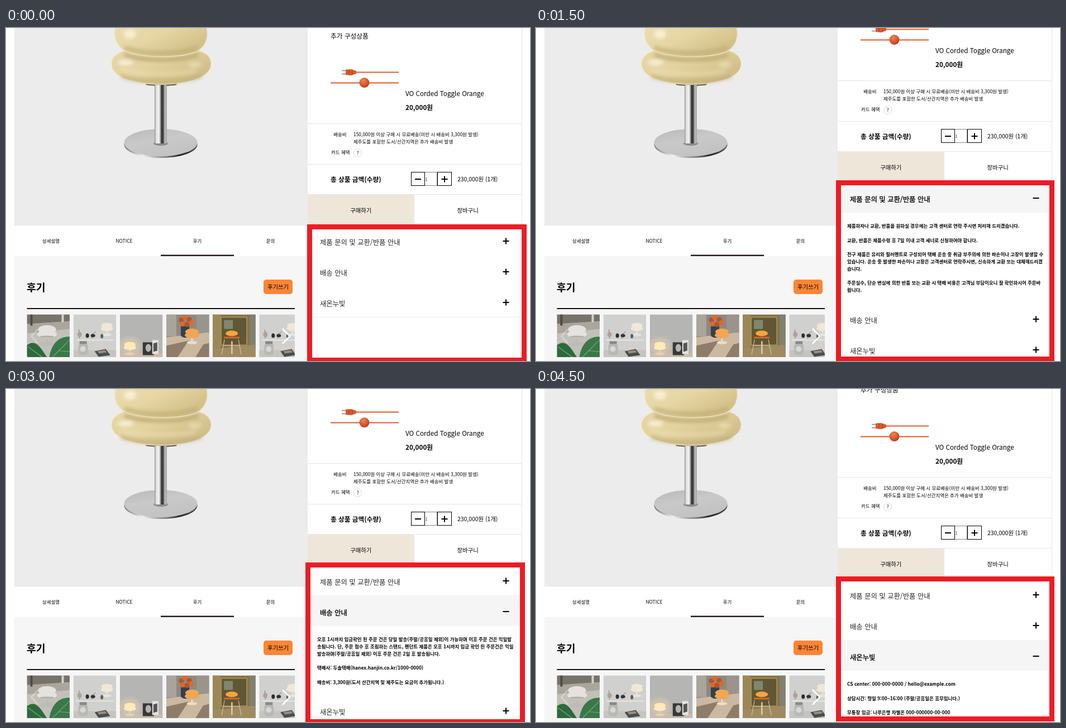
Write an HTML page that moves like this. It is 938 px wide and 597 px high and loops after 6000 ms.

```html
<!DOCTYPE html>
<html lang="ko">
<head>
<meta charset="utf-8">
<title>상품 상세</title>
<style>
html, body { margin: 0; width: 100%; height: 100%; overflow: hidden; background: #fff; }
svg { display: block; }
text { font-family: "Noto Sans CJK KR", "Noto Sans CJK", "Noto Sans KR", sans-serif; fill: #000; white-space: pre; }
.open { stroke: #000; stroke-width: .3px; }
.closed { fill: #262626; }
</style>
</head>
<body>
<svg id="stage" width="938" height="597" viewBox="0 0 938 597">
  <defs>
    <linearGradient id="upper" x2=".9" y2=".6">
      <stop offset="0" stop-color="#eadcae"/><stop offset=".5" stop-color="#e5d6a4"/><stop offset="1" stop-color="#d3c18a"/>
    </linearGradient>
    <linearGradient id="lower" x2=".9" y2=".6">
      <stop offset="0" stop-color="#e6d7a8"/><stop offset=".5" stop-color="#e3d39f"/><stop offset="1" stop-color="#d2c08b"/>
    </linearGradient>
    <linearGradient id="stem">
      <stop offset="0" stop-color="#8d8d8d"/><stop offset=".12" stop-color="#dedede"/><stop offset=".36" stop-color="#f4f4f4"/>
      <stop offset=".48" stop-color="#999"/><stop offset=".56" stop-color="#333"/><stop offset=".72" stop-color="#4a4a4a"/>
      <stop offset=".82" stop-color="#bbb"/><stop offset="1" stop-color="#a5a5a5"/>
    </linearGradient>
    <linearGradient id="plate" x2=".5" y2="1">
      <stop offset="0" stop-color="#b9b9b9"/><stop offset=".5" stop-color="#c9c9c9"/><stop offset="1" stop-color="#c2c2c2"/>
    </linearGradient>
    <linearGradient id="rim">
      <stop offset="0" stop-color="#777"/><stop offset=".25" stop-color="#eee"/><stop offset=".55" stop-color="#888"/><stop offset=".75" stop-color="#222"/><stop offset="1" stop-color="#555"/>
    </linearGradient>
    <radialGradient id="ball" cx=".4" cy=".3" r=".75">
      <stop offset="0" stop-color="#f08355"/><stop offset=".6" stop-color="#d9572c"/><stop offset="1" stop-color="#a33c1c"/>
    </radialGradient>
    <filter id="soft" x="-30%" y="-80%" width="160%" height="260%"><feGaussianBlur stdDeviation="3"/></filter>
  </defs>
  <g id="left"></g>
  <g id="side"></g>
  <path id="frame" fill="#ed1c24" fill-rule="evenodd"/>
</svg>
<script>
const $ = id => document.getElementById(id);
const rect = (x, y, w, h, fill, more = '') => `<rect x="${x}" y="${y}" width="${w}" height="${h}" fill="${fill}" ${more}/>`;
const oval = (x, y, rx, ry, fill, more = '') => `<ellipse cx="${x}" cy="${y}" rx="${rx}" ry="${ry}" fill="${fill}" ${more}/>`;
const path = (d, fill, more = '') => `<path d="${d}" fill="${fill}" ${more}/>`;
const stroke = (d, color, width, more = '') => path(d, 'none', `stroke="${color}" stroke-width="${width}" ${more}`);
// cy is the middle of the glyphs
const text = (x, cy, size, str, weight = 400, anchor = 'start', more = '') =>
  `<text x="${x}" y="${cy + size * .37}" font-size="${size}" font-weight="${weight}" text-anchor="${anchor}" ${more}>${str}</text>`;
const minus = (x, y) => rect(x - 5.5, y - 1, 11, 2, '#000');
const plus = (x, y) => minus(x, y) + rect(x - 1, y - 5.5, 2, 11, '#000');

function bigLamp() {
  const soft = opacity => `filter="url(#soft)" opacity="${opacity}"`;
  return oval(278, 101, 28, 3, '#55503f') +
    oval(277, 209, 65.5, 24, 'url(#rim)') + oval(277, 205.5, 65.5, 24.5, 'url(#plate)') +
    oval(277, 207, 13, 4, '#8b8b8b') + rect(266, 102, 22, 105, 'url(#stem)') +
    path('M210 41C192 47 185 59 190 72C197 91 235 101 278 101C320 101 359 91 366 72C371 57 363 46 347 41Z', 'url(#lower)', 'stroke="#f3ead0" stroke-width="1.5"') +
    stroke('M212 48C245 60 310 60 344 48', '#b39f66', 6, soft(.8)) +
    stroke('M206 86C240 99 316 99 350 86', '#bca974', 6, soft(.7)) +
    stroke('M206 74C240 84 310 84 340 76', '#efe3ba', 5, soft(.6)) +
    path('M196 -3C191 18 198 34 215 42C245 54 310 54 340 43C357 35 364 18 359 -3Z', 'url(#upper)', 'stroke="#f1e8cb" stroke-width="1.5"') +
    stroke('M212 35C245 48 310 48 343 35', '#bda96f', 7, soft(.7)) +
    oval(222, 11, 11, 8, '#f9f2d8', soft(.9)) +
    oval(214, 62, 14, 5, '#f9f3de', soft(.9)) +
    oval(338, 66, 12, 5, '#f5ecca', soft(.5));
}

function smallLamp(x, y, w, color, foot = '#d8d4cd') {
  return rect(x - w * .05, y, w * .1, w * .75, foot) + oval(x, y + w * .75, w * .36, w * .11, foot) +
    oval(x, y, w * .46, w * .22, color) + oval(x, y + w * .24, w * .5, w * .21, color);
}

function shelf() {
  return rect(0, 0, 77, 77, '#d0d1cf') + rect(0, 64, 77, 13, '#c6c4bf') +
    smallLamp(60, 20, 22, '#f1e7d7', '#e7e4de') + stroke('M5 46H72', '#e6e5e1', 2) +
    stroke('M10 27L11 43M33 43V36L40 31', '#777', 1) +
    oval(11, 36, 4, 5, '#b0a299') + oval(25, 38, 3, 4, '#2d2d2d') + oval(35, 38, 4, 3, '#333') + oval(51, 39, 2.5, 4, '#6b5a50') +
    rect(9, 52, 17, 21, '#b8b8b5', 'rx="5"') + rect(11, 48, 13, 5, '#888987') + oval(17, 62, 5, 5, '#d8d8d5') +
    path('M38 66L58 62L66 73L45 76Z', '#465052') + path('M43 66L57 64L60 68L46 70Z', '#a78a77');
}

const photos = [
  rect(0, 0, 77, 77, '#aaa69e') + path('M0 0H77V12L0 17Z', '#77736b') + rect(6, 0, 4, 20, '#4f4a43') + rect(62, 0, 4, 14, '#d5d2cc') +
    path('M0 34L77 26V77H0Z', '#c3c0ba') + path('M0 55C16 43 25 60 36 77H0Z', '#2d6a3b') + path('M40 77C44 49 60 39 77 40V77Z', '#397847') +
    stroke('M2 58L28 77M46 76L77 45M57 65L77 67', '#77a97d', 1.2) + smallLamp(36, 27, 35, '#e4e2de', '#bdbbb6') +
    oval(36, 40, 13, 2, '#b5b2ac'),
  shelf(),
  rect(0, 0, 77, 77, '#b5b5b4') + rect(0, 69, 77, 8, '#c9bcaa') + oval(18, 57, 20, 17, '#d8c9ae', 'filter="url(#soft)" opacity=".65"') +
    smallLamp(18, 54, 22, '#ffe9b9', '#e3d1b4') + rect(41, 50, 20, 23, '#383838') + oval(51, 60, 5, 7, '#b4b4b2') +
    rect(58, 46, 11, 25, '#e5e3df') + path('M60 52L67 50V65L60 67Z', '#555'),
  rect(0, 0, 77, 77, '#8e8980') + rect(0, 0, 18, 39, '#a9a59d') + rect(54, 0, 23, 35, '#99958c') + path('M0 41L77 32V77H0Z', '#cbb8a1') +
    path('M0 56L40 47L20 77H0ZM52 77L66 54L77 51V77Z', '#8f7c69') + path('M26 21H41L42 38C38 43 30 43 26 38Z', '#34414b') +
    [[27, 10], [33, 5], [41, 9], [29, 17], [37, 18], [45, 15]].map(([x, y], i) => oval(x, y, 4.5, 4.5, i % 2 ? '#e0682a' : '#b75227')).join('') +
    smallLamp(46, 31, 26, '#f3a552', '#ebddc8'),
  rect(0, 0, 77, 77, '#86724a') + rect(0, 0, 14, 77, '#9c8756') + rect(15, 5, 46, 50, '#5f5735', 'stroke="#a98d55" stroke-width="2"') +
    rect(20, 10, 16, 16, '#7f876f') + rect(66, 0, 11, 60, '#80816f') + path('M0 62L77 54V77H0Z', '#a08a62') +
    oval(34, 34, 11, 5, '#f5a53a') + rect(20, 40, 28, 3, '#d66a26') +
    stroke('M21 45L16 72M46 45L51 72M20 56H49', '#cfc2a0', 1.2) + rect(33, 48, 2.5, 23, '#dccfb0'),
  shelf()
];

function drawLeft() {
  const tabs = ['상세설명', 'NOTICE', '후기', '문의'];
  $('left').innerHTML =
    rect(15, 0, 525, 354.5, '#ececec') + bigLamp() +
    tabs.map((t, i) => text(80.5 + 131 * i, 382, 8.45, t, 400, 'middle')).join('') +
    rect(15, 409, 525, 188, '#f6f6f6') + rect(277, 406.5, 131, 2.5, '#2a1b1e') +
    text(37, 465.5, 18.2, '후기', 700) +
    rect(461, 451, 52, 26, '#fd8535', 'rx="5"') + text(487, 464.2, 10.4, '후기쓰기', 400, 'middle') +
    rect(37.5, 502, 479.5, 2, '#111') +
    photos.map((p, i) => `<svg x="${37.5 + 83.15 * i}" y="513.5" width="${i < 5 ? 76.5 : 63.7}" height="76.5">${p}</svg>`).join('') +
    stroke('M57 540L45.5 552.5L57 565', '#fff', 2.4, 'opacity=".35"') +
    stroke('M495 539L508 552.5L495 566', '#fff', 2.6);
}

function cable() {
  return rect(626, 78.3, 77, 2.2, '#e2683f') + rect(581, 97.3, 122, 2.2, '#e2683f') +
    stroke('M601 76.5H610M601 82.5H610', '#8d8078', 1.5) +
    path('M608 74.5L618 74L627 77V82L618 85L608 84Z', '#d9592d') + stroke('M614 75V84M620 75.5V83.5', '#a9421f', 1) +
    oval(641.5, 98, 9, 9, 'url(#ball)');
}

function product() {
  const rule = y => rect(540, y, 383, 1, '#e5e5e5');
  return text(581, 15, 11.7, '추가 구성상품') + cable() +
    text(715, 117.5, 11.7, 'VO Corded Toggle Orange') + text(715, 142.3, 11.7, '20,000원', 700) +
    rule(171) + text(598, 191, 8.45, '배송비', 400, 'middle') +
    text(622, 191, 8.45, '150,000원 이상 구매 시 무료배송(미만 시 배송비 3,300원 발생)') +
    text(622, 204, 8.45, '제주도를 포함한 도서/산간지역은 추가 배송비 발생') +
    text(582, 223, 8.45, '카드 혜택') +
    rect(622.5, 217, 14, 14, '#fff', 'rx="6" stroke="#ddd"') + text(629.7, 224, 8.5, '?', 500, 'middle') +
    rule(244) + text(581, 271.5, 11.7, '총 상품 금액(수량)', 700) +
    rect(749.5, 258.5, 22, 24, '#fff', 'stroke="#888"') +
    rect(725.5, 258.5, 24, 24, 'none', 'stroke="#000"') + rect(772.5, 258.5, 25, 24, 'none', 'stroke="#000"') +
    minus(737.5, 271) + plus(785, 271) + text(750.5, 271, 7, '1', 400, 'start', 'style="fill:#5a2a12"') +
    text(808, 271.5, 10.4, '230,000원 (1개)') +
    rule(298) + rect(540, 299, 191, 54, '#efe6da') +
    text(635.3, 327, 10.4, '구매하기', 400, 'middle') + text(826.7, 327, 10.4, '장바구니', 400, 'middle') +
    rect(923, 0, 1, 430, '#e5e5e5');
}

const panels = [
  { title: '제품 문의 및 교환/반품 안내', height: 162, lines: [
    '제품하자나 교환, 반품을 원하실 경우에는 고객 센터로 연락 주시면 처리해 드리겠습니다.', '',
    '교환, 반품은 제품수령 후 7일 이내 고객 세너로 신청하여야 합니다.', '',
    '전구 제품은 유리와 필러멘트로 구성되어 택배 운송 중 취급 부주의에 의한 파손이나 고장이 발생할 수',
    '있습니다. 운송 중 발생한 파손이나 고장은 고객센터로 연락주시면, 신속하게 교환 또는 대체해드리겠',
    '습니다.', '',
    '주문실수, 단순 변심에 의한 반품 또는 교환 시 택배 비용은 고객님 부담이오니 잘 확인하시어 주문바',
    '랍니다.'] },
  { title: '배송 안내', height: 123, lines: [
    '오후 1시까지 입금확인 된 주문 건은 당일 발송(주말/공휴일 제외)이 가능하며 이후 주문 건은 익일발',
    '송됩니다. 단, 주문 접수 후 조립하는 스탠드, 펜던트 제품은 오후 1시까지 입금 확인 된 주문건은 익일',
    '발송하며(주말/공휴일 제외) 이후 주문 건은 2일 후 발송됩니다.', '',
    '택배사: 두솔택배(hanex.hanjin.co.kr/1000-0000)', '',
    '배송비: 3,300원(도서 산간지역 및 제주도는 요금이 추가됩니다.)'] },
  { title: '새온누빛', height: 123, lines: [
    'CS center: 000-000-0000 / hello@example.com', '',
    '상담시간: 평일 9:00~16:00 (주말/공휴일은 휴무입니다.)', '',
    '무통장 입금: 나루은행 차별온 000-000000-00-000'] }
];

function accordion(open) {
  let y = 353, out = '';
  panels.forEach((p, i) => {
    const on = i === open;
    out += rect(540, y, 383, 55, on ? '#f5f5f5' : '#fff') +
      text(562, y + 31.2, 12.35, p.title, 400, 'start', `class="${on ? 'open' : 'closed'}"`) +
      (on ? minus : plus)(895, y + 29);
    y += 55;
    if (on) {
      out += p.lines.map((s, n) => text(557, y + 24 + 12.75 * n, 8.45, s, 700)).join('');
      y += p.height;
    }
    out += rect(540, y, 383, 1, '#eaeaea');
  });
  return out;
}

// open panel, scroll offset, outer and inner edges of the red frame
const states = [
  { open: -1, scroll: 0, outer: [539, 352, 932, 597], inner: [548, 361, 923, 591] },
  { open: 0, scroll: -77, outer: [537, 273, 928, 597], inner: [546, 282, 919, 589] },
  { open: 1, scroll: -38, outer: [536, 311, 929, 597], inner: [545, 320, 920, 592] },
  { open: 2, scroll: -13, outer: [537, 336, 928, 596], inner: [546, 345, 919, 587] }
];
const box = ([x, y, r, b]) => `M${x} ${y}H${r}V${b}H${x}Z`;
let shown = -1;

function draw(time) {
  const k = Math.floor(time % 6000 / 1500);
  if (k === shown) return;
  shown = k;
  const s = states[k];
  $('side').innerHTML = product() + accordion(s.open);
  $('side').setAttribute('transform', `translate(0 ${s.scroll})`);
  $('frame').setAttribute('d', box(s.outer) + box(s.inner));
}

drawLeft();
draw(0);
const start = performance.now();
(function tick() {
  draw(performance.now() - start);
  requestAnimationFrame(tick);
})();
</script>
</body>
</html>
```
